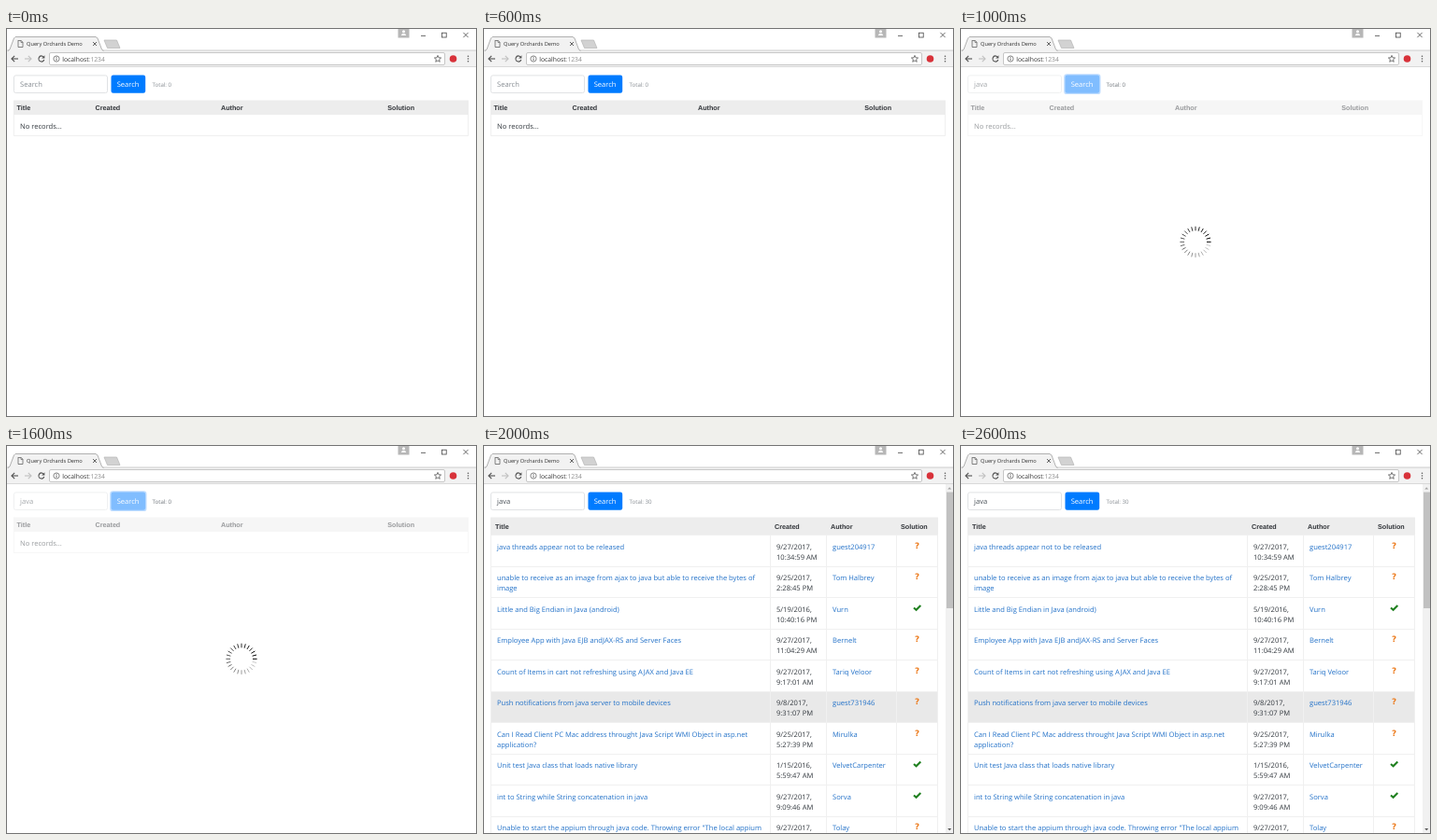
Recreate the animation shown at these times as an HTML page with a canvas. Size 504 by 417 pixels, loop 3 s.

```html
<!DOCTYPE html>
<html lang="en">
<head>
<meta charset="utf-8">
<title>Question search</title>
<style>
  html, body { margin: 0; width: 100%; height: 100%; overflow: hidden; background: #fff; }
  canvas { display: block; }
</style>
</head>
<body>
<canvas id="stage" width="504" height="417"></canvas>
<script>
const ctx = document.getElementById('stage').getContext('2d');
const W = 504, H = 417, STEP = 1000;
const SANS = '"Open Sans", "Noto Sans", sans-serif';
const HEAD = '"Liberation Sans", Arial, sans-serif';
const BOLD = '"DejaVu Sans", sans-serif';
const LINK = '#2271c8', INK = '#32383e', MUTED = '#858b91', BLUE = '#007bff';
const RULE = '#f0f0f0';

const ROWS = [
  ['java threads appear not to be released', '9/27/2017,\n10:34:59 AM', 'guest204917'],
  ['unable to receive as an image from ajax to java but able to receive the bytes of\nimage', '9/25/2017,\n2:28:45 PM', 'Tom Halbrey'],
  ['Little and Big Endian in Java (android)', '5/19/2016,\n10:40:16 PM', 'Vurn', true],
  ['Employee App with Java EJB andJAX-RS and Server Faces', '9/27/2017,\n11:04:29 AM', 'Bernelt'],
  ['Count of Items in cart not refreshing using AJAX and Java EE', '9/27/2017,\n9:17:01 AM', 'Tariq Veloor'],
  ['Push notifications from java server to mobile devices', '9/8/2017,\n9:31:07 PM', 'guest731946'],
  ['Can I Read Client PC Mac address throught Java Script WMI Object in asp.net\napplication?', '9/25/2017,\n5:27:39 PM', 'Mirulka'],
  ['Unit test Java class that loads native library', '1/15/2016,\n5:59:47 AM', 'VelvetCarpenter', true],
  ['int to String while String concatenation in java', '9/27/2017,\n9:09:46 AM', 'Sorva', true],
  ['Unable to start the appium through java code. Throwing error "The local appium', '9/27/2017,', 'Tolay']
];
const HOVERED = 5;

function rect(x, y, w, h, color) {
  ctx.fillStyle = color;
  ctx.fillRect(x, y, w, h);
}

function frame(x, y, w, h, color) {
  ctx.strokeStyle = color;
  ctx.lineWidth = 1;
  ctx.strokeRect(x + .5, y + .5, w - 1, h - 1);
}

function roundBox(x, y, w, h, r, fill, stroke) {
  ctx.beginPath();
  ctx.roundRect(x, y, w, h, r);
  if (fill) { ctx.fillStyle = fill; ctx.fill(); }
  if (stroke) { ctx.strokeStyle = stroke; ctx.lineWidth = 1; ctx.stroke(); }
}

function line(color, width, ...p) {
  ctx.beginPath();
  for (let i = 0; i < p.length; i += 2) ctx.lineTo(p[i], p[i + 1]);
  ctx.strokeStyle = color;
  ctx.lineWidth = width;
  ctx.stroke();
}

function poly(fill, ...p) {
  ctx.beginPath();
  for (let i = 0; i < p.length; i += 2) ctx.lineTo(p[i], p[i + 1]);
  ctx.closePath();
  ctx.fillStyle = fill;
  ctx.fill();
}

function disc(x, y, r, fill) {
  ctx.beginPath();
  ctx.arc(x, y, r, 0, Math.PI * 2);
  ctx.fillStyle = fill;
  ctx.fill();
}

function arc(x, y, r, from, to, color, width) {
  ctx.beginPath();
  ctx.arc(x, y, r, from, to);
  ctx.strokeStyle = color;
  ctx.lineWidth = width;
  ctx.stroke();
}

function text(str, x, y, color, size = 7.59, family = SANS, weight = 400) {
  ctx.font = `${weight} ${size}px ${family}`;
  ctx.textRendering = 'geometricPrecision';
  ctx.fillStyle = color;
  str.split('\n').forEach((part, i) => ctx.fillText(part, x, y + i * 11));
}

function heading(str, x, y) {
  text(str, x, y, '#303338', 7.2, HEAD, 700);
}

function cross(x, y, r, color, width) {
  line(color, width, x - r, y - r, x + r, y + r);
  line(color, width, x - r, y + r, x + r, y - r);
}

function star(x, y) {
  ctx.beginPath();
  for (let i = 0; i < 10; i++) {
    const a = i * Math.PI / 5 - Math.PI / 2, r = i % 2 ? 1.7 : 3.8;
    ctx.lineTo(x + r * Math.cos(a), y + r * Math.sin(a));
  }
  ctx.closePath();
  ctx.strokeStyle = '#555';
  ctx.lineWidth = .8;
  ctx.stroke();
}

function arrow(x, dir, color) {
  line(color, 1.1, x - 3.5 * dir, 33, x + 3.5 * dir, 33);
  line(color, 1.1, x + .3 * dir, 29.8, x + 3.5 * dir, 33, x + .3 * dir, 36.2);
}

function browser() {
  // tab strip
  rect(0, 24, W, 18, '#f2f2f2');
  line('#cdcdcd', 1, 0, 24, W, 24);
  poly('#f2f2f2', 3, 25, 9, 10, 97, 10, 103, 25);
  line('#b0b0b0', 1, 2, 24.5, 4, 23, 8.5, 11, 10, 9.5, 96, 9.5, 98, 11, 102.5, 23, 104.5, 24.5);
  poly('#d2d2d2', 105, 13, 118.5, 13, 122, 21.5, 108.5, 21.5);
  line('#b5b5b5', .7, 105, 13, 118.5, 13, 122, 21.5, 108.5, 21.5, 105, 13);
  line('#666', .8, 13, 13.5, 16.3, 13.5, 18, 15.3, 18, 20.5, 13, 20.5, 13, 13.1);
  line('#666', .7, 16, 13.5, 16, 15.5, 18, 15.5);
  text('Query Orchards Demo', 22, 19.3, '#333', 5.7);
  cross(95, 17, 2, '#555', .9);

  // window buttons
  rect(419.5, 0, 12, 10.5, '#b7b7b7');
  disc(425.5, 3.8, 1.5, '#fff');
  poly('#fff', 422.8, 8, 424, 6, 427, 6, 428.2, 8);
  line('#444', .8, 444, 8.4, 449, 8.4);
  ctx.strokeStyle = '#444';
  ctx.lineWidth = .8;
  ctx.strokeRect(466.4, 5.2, 4.8, 4.8);
  cross(492, 7.5, 2.6, '#444', .8);

  // toolbar
  arrow(9.5, -1, '#505050');
  arrow(23.5, 1, '#c0c0c0');
  arc(38, 33, 3, .35, Math.PI * 1.72, '#505050', 1.1);
  poly('#505050', 41.4, 29.2, 41.4, 32.5, 38.2, 32.5);
  roundBox(46.5, 26.5, 423, 13, 1.5, '#fff', '#c6c6c6');
  arc(54, 33, 3.1, 0, Math.PI * 2, '#666', .8);
  rect(53.5, 32.5, 1, 2.3, '#666');
  rect(53.5, 30.8, 1, 1, '#666');
  text('localhost', 60.3, 35.7, '#333', 6.75);
  text(':1234', 88.6, 35.7, '#8a8a8a', 6.75);
  star(462, 33.2);
  disc(478.5, 33, 3.8, '#d8323a');
  for (const y of [30.3, 33, 35.7]) disc(494.5, y, .8, '#555');
  line('#d8d8d8', 1, 0, 41.5, W, 41.5);
}

function searchBar(value) {
  roundBox(8.5, 50.9, 100, 18.6, 2, '#fff', '#e0e2e4');
  text(value || 'Search', 15, 63.2, value ? '#495057' : MUTED);
  roundBox(112.5, 50.6, 36.7, 19.2, 2.2, BLUE);
  text('Search', 118.7, 63.2, '#fff');
}

function total(count, color = MUTED) {
  text('Total: ' + count, 156.6, 63, color, 6.1);
}

function emptyTable() {
  frame(8, 92, 487, 24, '#f0f0f0');
  rect(8, 77.5, 487, 15.5, '#ededed');
  heading('Title', 11.6, 87.9);
  heading('Created', 95.5, 87.9);
  heading('Author', 230, 87.9);
  heading('Solution', 408.3, 87.9);
  text('No records...', 15, 107.9, INK);
}

function spinner(cx, cy) {
  const ticks = 24;
  for (let i = 0; i < ticks; i++) {
    const a = -i * Math.PI * 2 / ticks, c = Math.cos(a), s = Math.sin(a);
    const shade = Math.round(215 * Math.pow(i / ticks, 1.15));
    line(`rgb(${shade},${shade},${shade})`, 1,
      cx + 12 * c, cy + 12 * s, cx + 16.6 * c, cy + 16.6 * s);
  }
}

function scrollbar() {
  rect(495, 42, 8, 374, '#f1f1f1');
  rect(496, 50.5, 7, 124.5, '#c1c1c1');
  poly('#a3a3a3', 497.2, 47.5, 499.2, 45.3, 501.2, 47.5);
  poly('#555', 497.2, 411, 499.2, 413.2, 501.2, 411);
}

function results() {
  const top = 97, pitch = 33.5;
  rect(8, 77.5, 479, 19.5, '#ededed');
  heading('Title', 13, 89.8);
  heading('Created', 312, 89.8);
  heading('Author', 372, 89.8);
  heading('Solution', 447, 89.8);
  ROWS.forEach(([title, date, author, solved], i) => {
    const y = Math.round(top + i * pitch), base = top + i * pitch + 14.9, mid = base - 3.9;
    if (i === HOVERED) rect(8, y, 479, 33, '#e9e9e9');
    line(RULE, 1, 8, y - .5, 487, y - .5);
    text(title, 15, base, LINK);
    text(date, 314, base, INK);
    text(author, 374, base, LINK);
    if (solved) line('#208020', 2.1, 461, mid - .6, 463.6, mid + 1.8, 468.3, mid - 3);
    else text('?', 461.9, mid + 2.5, '#ec7a1c', 8.8, BOLD, 700);
  });
  for (const x of [8.5, 307.5, 367.5, 442.5, 486.5]) line(RULE, 1, x, top, x, H);
}

const SCENES = [
  () => { searchBar(''); total(0); emptyTable(); },
  () => {
    roundBox(111.2, 49.3, 39.3, 21.8, 3.2, 'rgba(0,123,255,.5)');
    searchBar('java');
    emptyTable();
    rect(1, 42, 502, 374, 'rgba(255,255,255,.5)');
    total(0, '#6c7278');
    spinner(252, 229.3);
  },
  () => { searchBar('java'); total(30); results(); scrollbar(); }
];

function draw() {
  const scene = Math.floor(performance.now() / STEP) % SCENES.length;
  rect(0, 0, W, H, '#fff');
  browser();
  SCENES[scene]();
  frame(0, 0, W, H, '#727272');
  requestAnimationFrame(draw);
}
draw();
</script>
</body>
</html>
```
